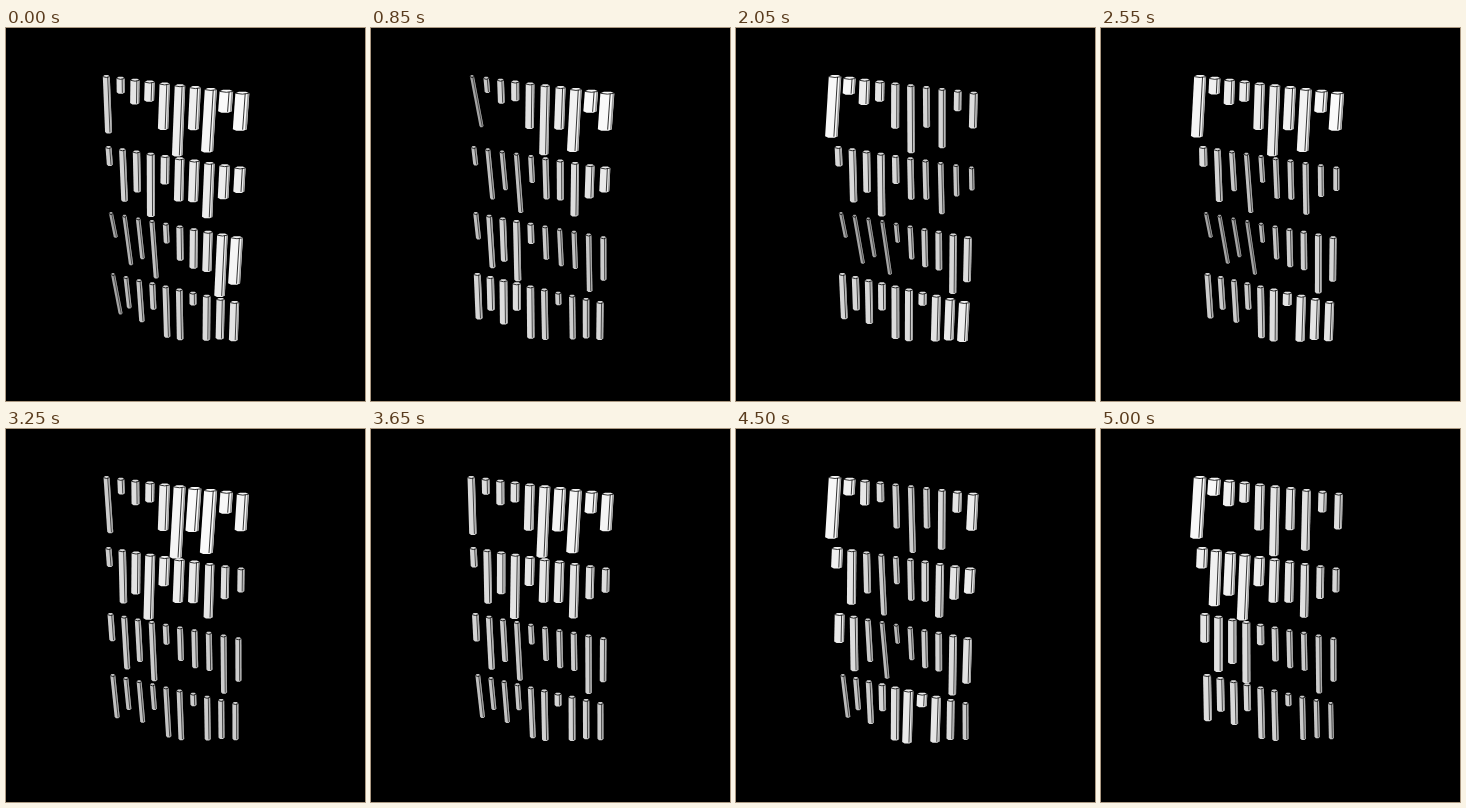
Animation of 359x373 px, one loop 5.05 s. Source, as an HTML page:

```html
<!DOCTYPE html>
<html lang="en">
<head>
<meta charset="utf-8">
<title>Bars</title>
<style>
html, body { margin: 0; width: 100%; height: 100%; overflow: hidden; background: #000; }
svg { display: block; width: 100%; height: 100%; }
</style>
</head>
<body>
<svg id="stage" viewBox="0 0 359 373"></svg>
<script>
const NS = 'http://www.w3.org/2000/svg';
const LOOP = 5050, STEP = 50;

// Full bar lengths, row by row
const lengths = [
  [63, 18, 27, 22, 49, 74, 45, 65, 23, 39],
  [22, 58, 45, 68, 31, 46, 44, 58, 36, 27],
  [31, 59, 48, 66, 23, 38, 43, 43, 65, 49],
  [50, 37, 48, 30, 57, 56, 15, 49, 44, 42]
];

// Thickness wave: time, then per row the width at columns 0, 3, 6 and 9
const waves = [
  [0, [7, 10, 11, 15], [6, 8, 10, 11], [4, 5, 8, 12], [4, 6, 7, 9]],
  [850, [4, 8, 10, 15], [5, 5, 7, 10], [5, 7, 5, 6], [7, 8, 6, 7]],
  [1550, [14, 9, 6, 7], [7, 8, 6, 5], [4, 4, 6, 8], [7, 8, 8, 11]],
  [2550, [12, 10, 11, 13], [8, 5, 6, 6], [4, 4, 6, 7], [6, 6, 9, 9]],
  [3250, [6, 9, 13, 12], [6, 10, 10, 7], [6, 6, 6, 6], [5, 5, 6, 6]],
  [4050, [14, 7, 6, 11], [11, 5, 7, 11], [10, 4, 6, 9], [4, 7, 11, 6]],
  [5000, [14, 10, 9, 8], [11, 11, 9, 7], [9, 8, 6, 6], [8, 7, 6, 5]]
];

const lerp = (a, b, k) => a + (b - a) * k;
const clamp = (v, lo, hi) => Math.min(hi, Math.max(lo, v));

function spline(p, u) {
  const i = Math.min(Math.floor(u), p.length - 2), k = u - i;
  const b = p[i], c = p[i + 1];
  const a = i ? p[i - 1] : 2 * b - c;
  const d = i + 2 < p.length ? p[i + 2] : 2 * c - b;
  return b + 0.5 * k * (c - a + k * (2 * a - 5 * b + 4 * c - d + k * (3 * (b - c) + d - a)));
}

function widthAt(t, r, c) {
  let i = 0;
  while (i < waves.length - 2 && t >= waves[i + 1][0]) i++;
  const from = waves[i], to = waves[i + 1];
  const k = ((t - from[0]) / (to[0] - from[0])) ** 2.5;
  const w = lerp(spline(from[r + 1], c / 3), spline(to[r + 1], c / 3), k);
  return clamp(w, 4, 12.5 + c * 0.17);
}

const stage = document.getElementById('stage');
function add(parent, name, attrs = {}) {
  const el = document.createElementNS(NS, name);
  for (const key in attrs) el.setAttribute(key, attrs[key]);
  return parent.appendChild(el);
}

add(stage, 'rect', { width: 359, height: 373, fill: '#000' });
const bars = lengths.flatMap((row, r) => row.map((len, c) => {
  const g = add(stage, 'g', { fill: 'none', stroke: '#000' });
  return {
    r, c, len,
    x: 100.3 + 2 * r + (14.4 - 0.46 * r) * c + (0.1 - 0.01 * r) * c * c,
    y: 47 + 73.5 * r - 2.5 * r * r + (1.85 + 0.42 * r) * c,
    body: add(g, 'path', { stroke: 'none' }),
    side: add(g, 'path', { stroke: '#999' }),
    ridge: add(g, 'path', { 'stroke-width': 0.9 }),
    rim: add(g, 'path', { 'stroke-width': 0.8 })
  };
}));

function drawBar(bar, t) {
  const w = widthAt(t, bar.r, bar.c), h = w / 2;
  const open = Math.sqrt(clamp((w - 4) / 9, 0, 1));
  const len = bar.len * lerp(0.83, 1, open);
  const x = bar.x - (w - 7) * 0.23, y = bar.y;
  const bx = x + len * lerp(0.18 - 0.013 * bar.c, -0.065, open), by = y + len;
  const lum = Math.round(lerp(165, 250, open));
  const line = u => `M${x + h * u},${y + 2}L${bx + h * u},${by - 1}`;

  bar.body.setAttribute('d',
    `M${x - h},${y + 1.5}L${x - h * 0.5},${y}H${x + h * 0.5}L${x + h},${y + 1.5}` +
    `L${bx + h},${by - 1.5}L${bx + h * 0.5},${by}H${bx - h * 0.5}L${bx - h},${by - 1.5}Z`);
  bar.body.setAttribute('fill', `rgb(${lum},${lum},${lum})`);
  bar.side.setAttribute('d', line(0.85));
  bar.side.setAttribute('stroke-width', w * 0.12);
  bar.ridge.setAttribute('d', line(0.4));
  bar.ridge.setAttribute('stroke-opacity', lerp(0.6, 0.9, open));
  bar.rim.setAttribute('d', `M${x - h},${y + 1.6}Q${x},${y + 3.4} ${x + h},${y + 1.6}`);
}

function render(ms) {
  const t = Math.floor((ms % LOOP) / STEP) * STEP;
  for (const bar of bars) drawBar(bar, t);
}

const start = performance.now();
function tick() {
  render(performance.now() - start);
  requestAnimationFrame(tick);
}
tick();
</script>
</body>
</html>
```
